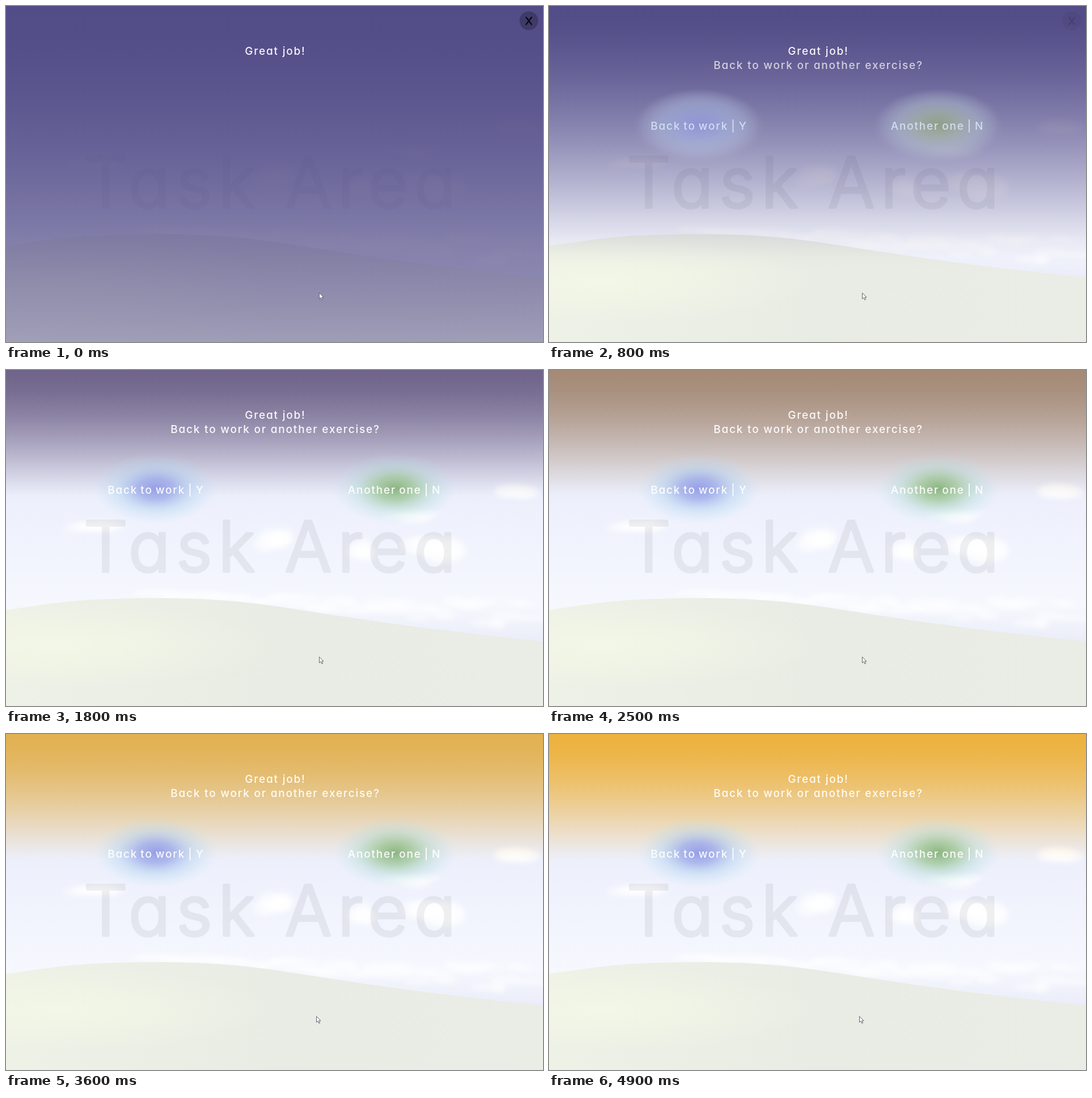
An HTML page that plays this animation: 947 px wide and 592 px high, repeating every 5 s.

```html
<!DOCTYPE html>
<html lang="en">
<head>
<meta charset="utf-8">
<title>Great job!</title>
<style>
  html, body { margin: 0; width: 100%; height: 100%; overflow: hidden; background: #eceefc; }
  svg { display: block; width: 100vw; height: 100vh; }
  text { font-family: Inter, Lato, sans-serif; font-feature-settings: "cv11"; }
  .line { font-size: 19px; font-weight: 500; letter-spacing: 1.8px; text-anchor: middle; fill: #fff; fill-opacity: .94; }
  .label { word-spacing: -1.8px; }
  .mark { font-size: 122px; font-weight: 300; letter-spacing: 11px; stroke: #000; stroke-width: 5px; stroke-linejoin: round; }
</style>
</head>
<body>
<svg viewBox="0 0 947 592" preserveAspectRatio="none">
  <defs>
    <linearGradient id="sky" x2="0" y2="1">
      <stop offset=".35" stop-color="#eceffc"/>
      <stop offset=".7" stop-color="#f6f8fe"/>
      <stop offset=".8" stop-color="#ebedf9"/>
    </linearGradient>
    <linearGradient id="grass">
      <stop offset="0" stop-color="#eef1e6"/>
      <stop offset=".5" stop-color="#e9ece4"/>
      <stop offset="1" stop-color="#eaece6"/>
    </linearGradient>
    <radialGradient id="sun">
      <stop offset="0" stop-color="#f3f7e6"/>
      <stop offset="1" stop-color="#f3f7e6" stop-opacity="0"/>
    </radialGradient>
    <linearGradient id="dusk" gradientUnits="userSpaceOnUse" x1="0" y1="0" x2="0" y2="592"></linearGradient>
    <radialGradient id="veilY">
      <stop offset="0" stop-color="#a0b2ec" stop-opacity=".5"/>
      <stop offset=".7" stop-color="#bab8de" stop-opacity=".38"/>
      <stop offset="1" stop-color="#c3c0da" stop-opacity="0"/>
    </radialGradient>
    <radialGradient id="veilN">
      <stop offset="0" stop-color="#c8a48c" stop-opacity=".62"/>
      <stop offset=".65" stop-color="#bcb8cc" stop-opacity=".4"/>
      <stop offset="1" stop-color="#c3c0da" stop-opacity="0"/>
    </radialGradient>
    <radialGradient id="glowY">
      <stop offset="0" stop-color="#9098e6" stop-opacity=".92"/>
      <stop offset=".3" stop-color="#9eace9" stop-opacity=".8"/>
      <stop offset=".62" stop-color="#b2d2ef" stop-opacity=".45"/>
      <stop offset="1" stop-color="#bee2f6" stop-opacity="0"/>
    </radialGradient>
    <radialGradient id="glowN">
      <stop offset="0" stop-color="#80ad70" stop-opacity=".88"/>
      <stop offset=".33" stop-color="#9dc698" stop-opacity=".74"/>
      <stop offset=".64" stop-color="#b4dad4" stop-opacity=".43"/>
      <stop offset="1" stop-color="#bee4f2" stop-opacity="0"/>
    </radialGradient>
    <filter id="soft"><feGaussianBlur stdDeviation="4"/></filter>
  </defs>

  <rect width="947" height="592" fill="url(#sky)"/>
  <g id="clouds" fill="#fff" fill-opacity=".5" filter="url(#soft)"></g>
  <path fill="url(#grass)" d="M0 423C80 412 110 403 250 402S450 412 560 429S830 468 947 478V592H0Z"/>
  <ellipse cx="90" cy="485" rx="380" ry="76" fill="url(#sun)"/>
  <g opacity=".055">
    <text class="mark" y="354.5"><tspan x="137">Task</tspan> <tspan x="492">Area</tspan></text>
  </g>

  <rect width="947" height="592" fill="url(#dusk)"/>

  <g id="veil">
    <ellipse cx="264" cy="211" rx="116" ry="66" fill="url(#veilY)"/>
    <ellipse cx="686" cy="211" rx="116" ry="66" fill="url(#veilN)"/>
  </g>
  <g id="glow">
    <ellipse cx="264" cy="209" rx="108" ry="62" fill="url(#glowY)"/>
    <ellipse cx="686" cy="209" rx="108" ry="62" fill="url(#glowN)"/>
  </g>

  <text class="line" x="475" y="86">Great job!</text>
  <text class="line" x="475" y="111" id="question">Back to work or another exercise?</text>
  <g id="labels">
    <text class="line label" x="264.5" y="218">Back to work | Y</text>
    <text class="line label" x="685" y="218">Another one | N</text>
  </g>

  <g id="close">
    <circle cx="922" cy="26" r="16.5" fill-opacity=".24"/>
    <path d="M917.3 20L926.7 32.5M926.7 20L917.3 32.5" stroke="#0d0c16" stroke-width="2.5" stroke-linecap="round"/>
  </g>
  <path id="pointer" d="M.5 .5V11L3 8.7L4.9 12.8L6.6 12L4.8 8.1H8Z" fill="#fff" stroke="#55555f" stroke-width=".9"/>
</svg>

<script>
const LOOP = 5000, STEP = 100, HEIGHT = 592, BANDS = 32;
const $ = id => document.getElementById(id);

function add(parent, tag, attrs) {
  const el = document.createElementNS("http://www.w3.org/2000/svg", tag);
  for (const k in attrs) el.setAttribute(k, attrs[k]);
  return parent.appendChild(el);
}

let seed = 7;
const random = () => (seed = seed * 16807 % 2147483647) / 2147483647;
const spread = size => (random() * 2 - 1) * size;

function puff(cx, cy, rx, ry) {
  add($("clouds"), "ellipse", { cx, cy, rx, ry });
}

// Cloud centres with half width and half height
for (const [x, y, w, h] of [
  [475, 298, 40, 26], [625, 318, 28, 24], [750, 314, 66, 30],
  [715, 258, 54, 13], [895, 214, 52, 20], [155, 275, 60, 14]
]) {
  for (let i = 0; i < 7; i++) puff(x + spread(w * .5), y + spread(h * .4), w * .5, h * .55);
}
// Low clouds follow the ridge down to the right
for (let i = 0; i < 45; i++) {
  const k = i / 45;
  puff(245 + 700 * k, 393 + k * (15 + random() * 50), 12 + random() * 22, 4 + random() * 4);
}

const stops = Array.from({ length: BANDS + 1 }, (_, i) => add($("dusk"), "stop", { offset: i / BANDS }));

const ramp = (t, from, to) => Math.min(1, Math.max(0, (t - from) / (to - from)));
const mix = (a, b, k) => a.map((v, i) => v + (b[i] - v) * k);
const rgb = c => `rgb(${c.map(Math.round)})`;
const fade = (id, value) => $(id).setAttribute("opacity", value);

const tints = [
  [1100, [82, 76, 135]], [1800, [112, 100, 138]],
  [3200, [217, 176, 98]], [4100, [237, 178, 62]]
];

function tint(t) {
  let color = tints[0][1];
  for (let i = 1; i < tints.length; i++) {
    color = mix(color, tints[i][1], ramp(t, tints[i - 1][0], tints[i][0]));
  }
  return rgb(color);
}

function draw(t) {
  const color = tint(t);
  const reach = 980 - 755 * ramp(t, 0, 1000) ** 1.6;
  stops.forEach((stop, i) => {
    const depth = Math.min(1, i / BANDS * HEIGHT / reach);
    stop.setAttribute("stop-color", color);
    stop.setAttribute("stop-opacity", (1 - depth ** 1.6) ** 1.2);
  });

  fade("close", 1 - ramp(t, 0, 1000));
  fade("question", ramp(t, 200, 1000));
  fade("veil", Math.sin(Math.PI * ramp(t, 100, 1000)));
  fade("glow", ramp(t, 550, 1000));
  fade("labels", ramp(t, 100, 650));
  const ink = rgb(mix([168, 194, 232], [255, 255, 255], ramp(t, 600, 1000)));
  for (const label of $("labels").children) label.style.fill = ink;

  const glide = 1 - (1 - ramp(t, 3100, 3700)) ** 6;
  $("pointer").setAttribute("transform", `translate(${mix([552, 505], [547, 497], glide)})`);
}

const start = performance.now();
function tick() {
  const t = (performance.now() - start) % LOOP;
  draw(Math.floor(t / STEP) * STEP);
  requestAnimationFrame(tick);
}
tick();
</script>
</body>
</html>
```
